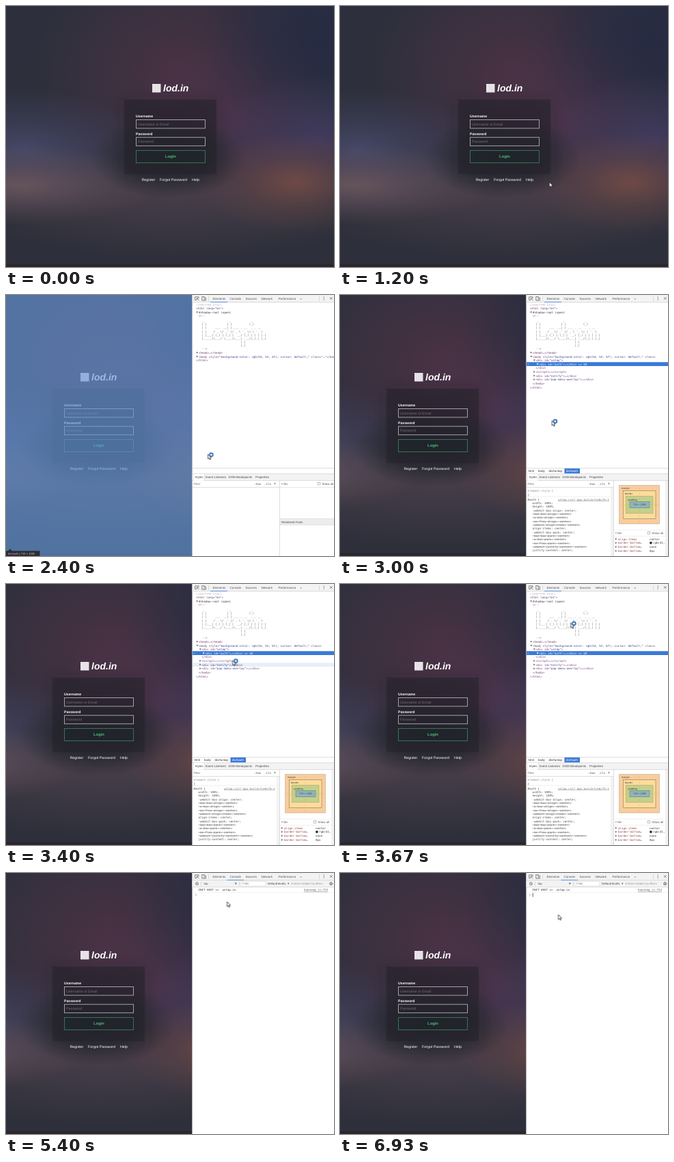
These frames come from a looping animation (480x382 px, 7.07 s). An HTML page:

```html
<!DOCTYPE html>
<html lang="en">
<head>
<meta charset="utf-8">
<title>Login page and developer tools</title>
<style>
html, body { margin: 0; width: 100%; height: 100%; overflow: hidden; background: #2c2c39; }
#stage { position: relative; width: 480px; height: 382px; overflow: hidden; }
#stage > * { position: absolute; left: 0; top: 0; }
svg { display: block; width: 480px; height: 382px; }
text { font-family: "Liberation Sans", Arial, sans-serif; text-rendering: geometricPrecision; white-space: pre; }
.mono { font-family: "DejaVu Sans Mono", monospace; }

#page { width: 480px; height: 382px; animation: dock 7070ms step-end infinite; }
#bg { position: absolute; inset: 0; background:
  linear-gradient(transparent 378px, #2e262d 378px),
  radial-gradient(115px 60px at 238px 222px, rgba(36,40,47,.95), rgba(36,40,47,.65) 55%, transparent),
  radial-gradient(150px 75px at 425px 258px, rgba(122,78,68,.8), rgba(108,72,68,.4) 50%, transparent),
  radial-gradient(210px 58px at 20px 262px, rgba(116,92,94,.75), rgba(104,84,92,.42) 50%, transparent),
  radial-gradient(200px 90px at 25px 212px, rgba(78,80,118,.75), rgba(72,72,108,.4) 50%, transparent),
  radial-gradient(160px 95px at 460px 195px, rgba(70,62,104,.75), transparent),
  radial-gradient(170px 150px at 455px 50px, rgba(37,42,68,.85), transparent),
  radial-gradient(150px 120px at 330px 165px, rgba(80,52,78,.65), transparent),
  radial-gradient(330px 95px at 250px 275px, rgba(82,68,80,.7), transparent),
  radial-gradient(210px 180px at 250px 95px, rgba(82,50,70,.75), transparent),
  linear-gradient(#2d303c, #2d2f3a); }
#page svg { position: absolute; }

#tint { width: 273px; height: 382px; background: rgba(100,150,215,.66); }
#tint, #tip { visibility: hidden; animation: tint 7070ms step-end infinite; }
#tools { visibility: hidden; animation: tools 7070ms step-end infinite; }
#elements { animation: elements 7070ms step-end infinite; }
#console { opacity: 0; animation: console 7070ms step-end infinite; }
#folded { animation: folded 7070ms step-end infinite; }
#opened { opacity: 0; animation: opened 7070ms step-end infinite; }
#hover { opacity: 0; animation: hover 7070ms step-end infinite; }
#caret { opacity: 0; animation: caret 7070ms step-end infinite; }
#ring { opacity: 0; animation: ring 7070ms step-end infinite; }
#cursor { animation: move 7070ms linear infinite; }

@keyframes dock { 0% { transform: none } 32.11%, 100% { transform: translateX(-105px) } }
@keyframes tools { 0% { visibility: hidden } 32.11%, 100% { visibility: visible } }
@keyframes tint {
  0%, 41.44%, 51.06%, 56.58%, 100% { visibility: hidden }
  32.11%, 49.22%, 55.45% { visibility: visible }
}
@keyframes elements { 0% { opacity: 1 } 59.41%, 100% { opacity: 0 } }
@keyframes console { 0% { opacity: 0 } 59.41%, 100% { opacity: 1 } }
@keyframes folded { 0% { opacity: 1 } 36.78%, 100% { opacity: 0 } }
@keyframes opened { 0% { opacity: 0 } 36.78%, 100% { opacity: 1 } }
@keyframes hover { 0%, 48.94%, 100% { opacity: 0 } 47.1% { opacity: 1 } }
@keyframes caret { 0% { opacity: 0 } 91.23%, 100% { opacity: 1 } }
@keyframes ring { 0%, 60.4%, 100% { opacity: 0 } 30.13% { opacity: 1 } }
@keyframes move {
  0%, 4.24% { transform: translate(335px, 390px) }
  11.32% { transform: translate(316px, 280px); animation-timing-function: ease-out }
  29%, 38.61% { transform: translate(295.5px, 233px) }
  48.09% { transform: translate(331.5px, 112px) }
  54.74% { transform: translate(342px, 16.5px) }
  58.4%, 70.72% { transform: translate(336px, 4px) }
  76.38% { transform: translate(323.5px, 42px); animation-timing-function: ease-out }
  87.69%, 100% { transform: translate(319.5px, 61px) }
}
</style>
</head>
<body>
<div id="stage">
  <div id="page">
    <div id="bg"></div>
    <svg viewBox="0 0 480 382">
      <defs><filter id="soft" x="-30%" y="-30%" width="160%" height="160%"><feGaussianBlur stdDeviation="9"/></filter></defs>
      <rect x="173" y="139" width="135" height="109" fill="#16161e" opacity=".25" filter="url(#soft)"/>
      <rect x="173" y="137" width="135" height="109" fill="#26232d" opacity=".55"/>
      <rect x="214" y="114" width="12.5" height="12.5" fill="#e6e3e8"/>
      <g fill="none" stroke="#b3acb8" stroke-width=".9">
        <rect x="190.500" y="166.500" width="101" height="12.500"/>
        <rect x="190.500" y="192.200" width="101" height="12.500"/>
      </g>
      <rect x="190.500" y="211.500" width="101" height="18" fill="#1c2628" fill-opacity=".4" stroke="#3b7a5e" stroke-width=".9"/>
      <g id="login"></g>
    </svg>
  </div>
  <div id="tint"></div>
  <svg id="tip" viewBox="0 0 480 382">
    <path d="M3 374.5l3-3 3 3h40.500v8H0v-8z" fill="#2c2d33"/>
    <g id="tipText"></g>
  </svg>
  <svg id="tools" viewBox="0 0 480 382">
    <path d="M272.500 0H480V382H272.500z" fill="#fff"/>
    <path d="M272.500 0H480V10.500H272.500z" fill="#f3f3f3"/>
    <path d="M272.700 0V382M272.500 10.500H480M296.500 2v7M458.500 2v7" stroke="#c8c8c8" stroke-width=".6"/>
    <g fill="none" stroke="#555" stroke-width=".7">
      <path d="M279 7.500h-2.300V2.800h5.300v2M279.300 4.800l3.200 3.200M279.300 7v-2.200h2.200"/>
      <path d="M286.800 2.500h3.400v5.500h-3.400zM290.500 4h2v4h-2"/>
      <path d="M474 3.200l3.600 3.600M477.600 3.200L474 6.800"/>
    </g>
    <path d="M464.700 2.400h1v1h-1zm0 2.100h1v1h-1zm0 2.100h1v1h-1z" fill="#555"/>
    <g id="tabs"></g>

    <g id="elements">
      <path d="M299 10.300h25" stroke="#4a88e8" stroke-width=".9"/>
      <g id="tree"></g>
      <g id="folded">
        <g id="foldedText"></g>
        <path d="M400.500 327.500H480v9h-79.500z" fill="#ededed"/>
        <path d="M400.500 327.500H480M400.500 336.500H480M400.500 281.500H480" stroke="#ccc" stroke-width=".5"/>
        <g id="fontText"></g>
      </g>
      <g id="opened">
        <path id="hover" d="M273 115.300H480v5.700H273z" fill="#e7effb"/>
        <path d="M273 98.200H480v5.700H273z" fill="#3b79d8"/>
        <path d="M328.500 253.800h22.500v7.500h-22.500z" fill="#3b79d8"/>
        <g id="openedText"></g>
        <path d="M273 295H396M400.500 344H480M400.500 353H480" stroke="#ddd" stroke-width=".5"/>
        <path d="M396 282h4v100h-4zM476 272h4v110h-4z" fill="#f2f2f2"/>
        <g id="box" stroke="#75684e" stroke-width=".5"></g>
        <g id="boxText"></g>
      </g>
      <path d="M272.500 261.700H480v9.800H272.500z" fill="#f3f3f3"/>
      <path d="M272.500 253.500H480M272.500 261.700H480M272.500 271.600H480M272.500 281.500h128M400.500 271.600V382M274 262v9.500M290 262v9.500" stroke="#c8c8c8" stroke-width=".6"/>
      <path d="M274.300 262h15.400v9.800h-15.400z" fill="#fff"/>
      <g id="styleTabs"></g>
    </g>

    <g id="console">
      <path d="M272.500 11H480v9.500H272.500z" fill="#f3f3f3"/>
      <path d="M272.500 20.600H480M285.500 12.500v6.500M341.500 12.500v6.500" stroke="#c8c8c8" stroke-width=".6"/>
      <path d="M272.500 28.600H480" stroke="#e8e8e8" stroke-width=".6"/>
      <path d="M323.500 10.300h24.500" stroke="#4a88e8" stroke-width=".9"/>
      <path d="M344 12.300h36v6.700h-36z" fill="#fff" stroke="#ccc" stroke-width=".5"/>
      <g fill="none" stroke="#555" stroke-width=".7">
        <circle cx="279.500" cy="15.600" r="2"/><path d="M278.100 14.200l2.800 2.800"/>
        <circle cx="475.700" cy="15.600" r="1.500" stroke-width="1"/>
        <circle cx="475.700" cy="15.600" r="2.300" stroke-dasharray=".9 .9"/>
      </g>
      <path d="M334.800 14.500h3l-1.500 2.400zM412 14.700h2.600l-1.300 2z" fill="#555"/>
      <path d="M276.900 30.700l1.700 1.500-1.700 1.500" fill="none" stroke="#5a94e6" stroke-width=".7"/>
      <g id="consoleText"></g>
      <path id="caret" d="M282.200 29.300v5.700" stroke="#222" stroke-width=".7"/>
    </g>
  </svg>
  <svg viewBox="0 0 480 382">
    <g id="cursor">
      <path d="M0 0v7l1.600-1.400 1.200 2.500 1.300-.6-1.200-2.400h2.200z" fill="#fff" stroke="#111" stroke-width=".7"/>
      <g id="ring" fill="none">
        <circle cx="4.800" cy=".8" r="2.400" stroke="#1d4a8c" stroke-width="1.700"/>
        <circle cx="4.800" cy=".8" r="2.400" stroke="#3f92ee" stroke-width="1"/>
      </g>
    </g>
  </svg>
</div>
<script>
const NS = 'http://www.w3.org/2000/svg';
const MONO = 4.15;

function make(parent, name, attrs, content) {
  const el = document.createElementNS(NS, name);
  for (const key in attrs) el.setAttribute(key, attrs[key]);
  if (content) el.textContent = content;
  parent.appendChild(el);
  return el;
}

function writer(id, size, fill, base) {
  const group = document.getElementById(id);
  return (x, y, str, more) => make(group, 'text', { x, y, 'font-size': size, fill, ...base, ...more }, str);
}

// Markup line: quoted values blue, tags purple.
function markup(id) {
  const put = writer(id, MONO, '#6d3a6c', { class: 'mono' });
  return (x, y, str, arrow) => {
    const line = put(x, y + 1.5, '');
    str.split(/("[^"]*"?)/).forEach(part => {
      if (part) make(line, 'tspan', part[0] === '"' ? { fill: '#3a3a88' } : {}, part);
    });
    if (arrow) triangle(id, x - 3.6, y, arrow === 'open');
  };
}

function triangle(id, x, y, open, fill = '#666') {
  const d = open ? `M${x} ${y - 1}h3l-1.5 2.3z` : `M${x + .4} ${y - 1.5}v3l2.3 -1.5z`;
  make(document.getElementById(id), 'path', { d, fill });
}

// Login form
const white = writer('login', 5.3, '#fff');
const bold = { 'font-weight': 700 };
white(230, 124.5, 'lod.in', { 'font-size': 14, 'font-style': 'italic', ...bold });
white(190, 163.3, 'Username', { 'font-size': 5.2, ...bold });
white(190, 189, 'Password', { 'font-size': 5.2, ...bold });
white(193, 174.7, 'Username or Email', { fill: '#746b78' });
white(193, 200.3, 'Password', { fill: '#746b78' });
white(241, 222.4, 'Login', { 'font-size': 5.8, fill: '#46bd79', 'text-anchor': 'middle', ...bold });
white(198.5, 256, 'Register');
white(225, 256, 'Forgot Password');
white(272, 256, 'Help');

const tip = writer('tipText', 4.1, '#e39ad8');
tip(3, 379.8, 'div#auth');
tip(19.5, 379.8, '| 719 × 1005', { fill: '#ccc' });

// Tool tabs
const tab = writer('tabs', 4.5, '#555');
[[302.5, 'Elements'], [327.5, 'Console'], [350.5, 'Sources'], [373.5, 'Network'],
 [398.5, 'Performance'], [430.5, '»']].forEach(([x, s]) => tab(x, 6.8, s));

// Element tree
const tree = markup('tree');
writer('tree', MONO, '#b5b5b5', { class: 'mono' })(278, 15.5, '<!DOCTYPE html>');
tree(278, 19.5, '<html lang="en">');
writer('tree', MONO, '#333', { class: 'mono' })(282, 26.6, '#shadow-root (open)');
triangle('tree', 278.4, 25);
const note = writer('tree', MONO, '#555', { class: 'mono' });
note(282, 32.2, '<!--');
String.raw`
 _              _            _
| |            | |          (_)
| |     ___  __| | ___ _ __  _ _ __
| |    / _ \/ _' |/ _ \ '_ \| | '_ \
| |___| (_) | (_| |  __/ |_) | | | | |
|_____|\___/ \__,_|\___| .__/|_|_| |_|
                       | |
                       |_|`.split('\n').slice(1).forEach((s, i) => note(286, 39 + i * 5.2, s));
note(287, 80.2, '-->');
tree(282, 84.3, '<head>…</head>', 'shut');

const body = '<body style="background-color: rgb(54, 52, 67); cursor: default;" class=';
const folded = markup('foldedText');
folded(282, 90, body + '"…"</body', 'shut');
folded(278, 95.6, '</html>');

const opened = markup('openedText');
opened(282, 90, body, 'open');
opened(286.5, 95.6, '<div id="untap">', 'open');
opened(286.5, 106.8, '</div>');
opened(286.5, 112.4, '<script>…</' + 'script>', 'shut');
opened(286.5, 118, '<div id="notify">…</div>', 'shut');
opened(286.5, 123.7, '<div id="pop-menu-overlay">…</div>', 'shut');
opened(282, 129.4, '</body>');
opened(278, 135, '</html>');
const picked = writer('openedText', MONO, '#fff', { class: 'mono' });
picked(274, 102, '…');
picked(291.5, 102.6, '<div id="auth">…</div> == $0');
triangle('openedText', 288, 101, false, '#fff');

// Breadcrumbs and side panels
const crumb = writer('openedText', 4.5, '#333');
crumb(275.5, 259.1, 'html');
crumb(290, 259.1, 'body');
crumb(305.5, 259.1, 'div#untap');
crumb(331, 259.1, 'div#auth', { fill: '#fff' });

const side = writer('styleTabs', 4.4, '#444');
[[276.5, 'Styles'], [292, 'Event Listeners'], [325.5, 'DOM Breakpoints'], [365, 'Properties']]
  .forEach(([x, s]) => side(x, 268.3, s));
side(274.5, 278, 'Filter', { fill: '#777' });
side(363.5, 278, ':hov', { class: 'mono', 'font-size': MONO });
side(378, 278, '.cls', { class: 'mono', 'font-size': MONO });
side(391.8, 278.3, '+', { 'font-size': 6 });

function filterRow(id, y, x) {
  const put = writer(id, 4.4, '#555');
  put(403, y, 'Filter', { fill: '#777' });
  put(x + 6, y, 'Show all');
  make(document.getElementById(id), 'rect',
    { x, y: y - 3.4, width: 3.4, height: 3.4, fill: '#fff', stroke: '#888', 'stroke-width': .5 });
}
filterRow('fontText', 278, 456.5);
writer('fontText', 4.4, '#444')(403, 333.5, 'Rendered Fonts');
filterRow('boxText', 350, 450.5);

const css = writer('openedText', MONO, '#444', { class: 'mono' });
css(274.5, 288, 'element.style {', { fill: '#888' });
css(274.5, 293.5, '}');
css(274.5, 300.5, '#auth {');
css(319, 300.5, 'untap.css? app build=fce6cf6:1', { fill: '#777', 'text-decoration': 'underline' });
['width: 100%', 'height: 100%', '-webkit-box-align: center', '~-moz-box-align: center', '~-o-box-align: center',
 '~-ms-flex-align: center', '~-webkit-align-items: center', 'align-items: center', '-webkit-box-pack: center',
 '~-moz-box-pack: center', '~-o-box-pack: center', '~-ms-flex-pack: center',
 '~-webkit-justify-content: center', 'justify-content: center'].forEach((rule, i) => {
  const off = rule[0] === '~';
  css(281.5, 306 + i * 5.32, rule.replace('~', '') + ';',
    off ? { 'text-decoration': 'line-through', fill: '#666' } : {});
});

// Box model
const box = document.getElementById('box');
[[408.5, 278.5, 59, 56.5, '#f9cc9d'], [414.5, 286.5, 47.5, 41, '#fddc9b'],
 [418.5, 294.5, 39.5, 25, '#c3d08b'], [424, 302.5, 29, 9, '#8cb6c0']].forEach(([x, y, width, height, fill], i) =>
  make(box, 'rect', { x, y, width, height, fill, 'stroke-dasharray': i % 2 ? 'none' : '1 .8' }));
const label = writer('boxText', 3.8, '#444');
label(412, 284, 'margin');
label(417, 292.3, 'border');
label(421.5, 300.5, 'padding');
label(438.5, 308.3, '719 × 1005', { 'text-anchor': 'middle' });
[283.5, 291.7, 299.7, 317, 325, 333].forEach(y => label(437.5, y, '-'));
[411, 416, 421, 455, 459.5, 464].forEach(x => label(x, 308, '-'));

const prop = writer('boxText', MONO, '#333', { class: 'mono' });
[['align-items', 'center'], ['border-bottom…', '  rgb(41,'], ['border-bottom…', 'none'], ['border-bottom…', '0px']]
  .forEach(([name, value], i) => {
    const y = 358.5 + i * 5.8;
    triangle('boxText', 402.5, y - 1.5);
    prop(407, y, name, { fill: '#8a4440' });
    prop(453, y, value);
  });
make(document.getElementById('boxText'), 'rect', { x: 453.3, y: 361.2, width: 3.2, height: 3.2, fill: '#222' });

// Console
const ui = writer('consoleText', 4.4, '#444');
ui(289.5, 17.2, 'top');
ui(346, 17.2, 'Filter', { fill: '#888' });
ui(383, 17.2, 'Default levels');
ui(417.5, 17.2, '8 items hidden by filters', { fill: '#999' });
const log = writer('consoleText', MONO, '#333', { class: 'mono' });
log(281.5, 26.4, 'INIT HOST =>  untap.in');
log(436, 26.4, 'kuesneg.js:723', { fill: '#555', 'text-decoration': 'underline' });
</script>
</body>
</html>
```
